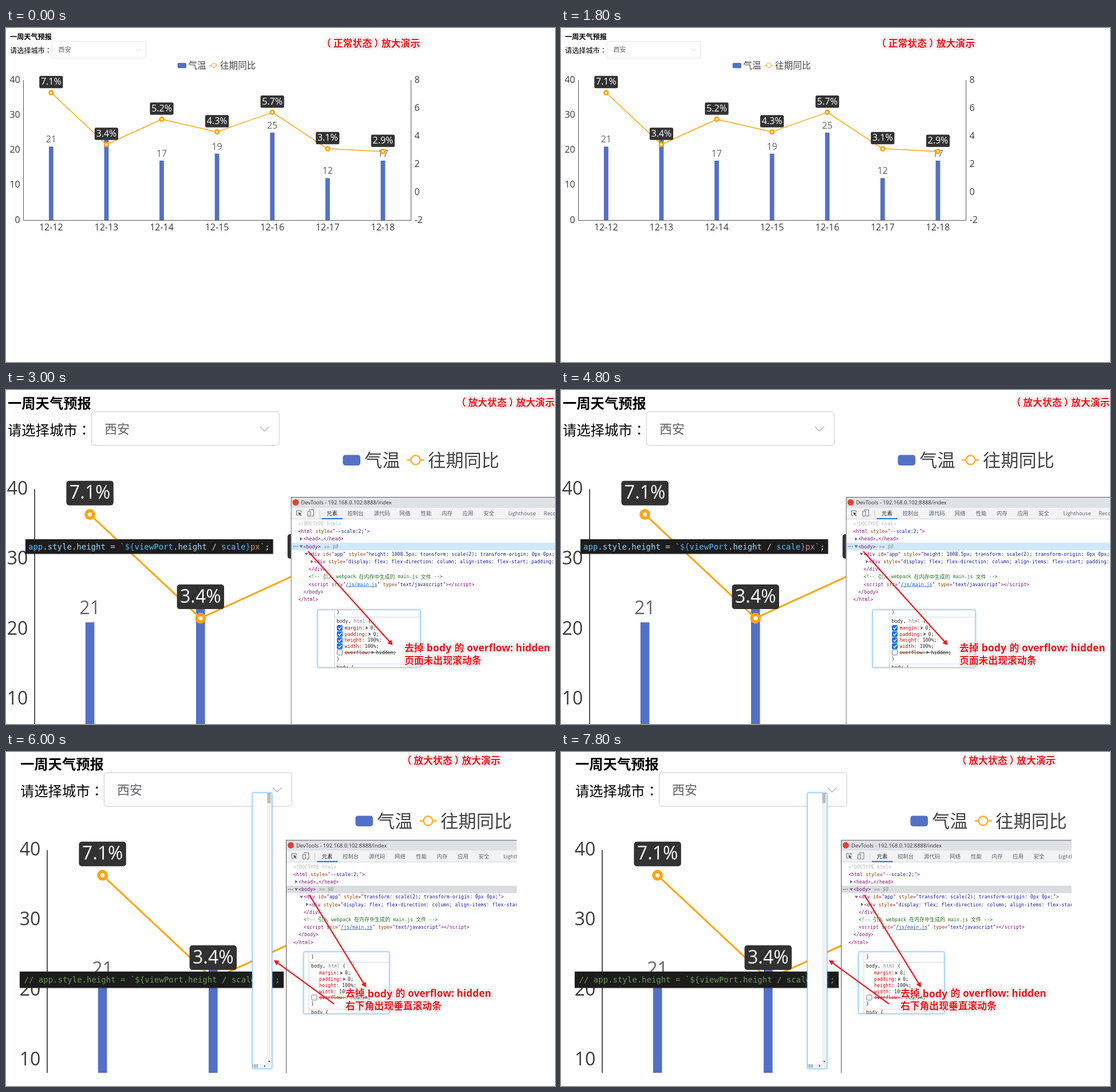
An HTML page that plays this animation: 959 px wide and 584 px high, repeating every 9 s.

```html
<!DOCTYPE html>
<html lang="zh-CN">
<head>
<meta charset="utf-8">
<style>
html, body { margin: 0; width: 100%; height: 100%; overflow: hidden; background: #fff; }
#stage { display: block; width: 959px; height: 584px; }
text { white-space: pre; font-family: "Open Sans", "Noto Sans CJK SC", "Noto Sans CJK", sans-serif; }
.mono { font-family: "DejaVu Sans Mono", "Noto Sans CJK SC", monospace; }
.colon { font-family: "Noto Sans CJK JP", "Noto Sans CJK", sans-serif; }
.note { fill: #e8141c; font-weight: 700; stroke: #fff; stroke-width: 3px; stroke-linejoin: round; paint-order: stroke; }
</style>
</head>
<body>
<svg id="stage" viewBox="0 0 959 584"></svg>
<script>
const RED = '#e8141c', ORANGE = '#ffa50f', BLUE = '#5470c6';
const TAG = '#881280', ATTR = '#994500', VAL = '#1a1aa6', GREY = '#bbb', GREEN = '#236e25';

const esc = s => s.replace(/&/g, '&amp;').replace(/</g, '&lt;').replace(/>/g, '&gt;');
const rect = (x, y, w, h, fill, more = '') =>
  `<rect x="${x}" y="${y}" width="${w}" height="${h}" fill="${fill}" ${more}/>`;
const path = (d, stroke, w = 1, more = '') =>
  `<path d="${d}" fill="none" stroke="${stroke}" stroke-width="${w}" ${more}/>`;
const shape = (d, fill) => `<path d="${d}" fill="${fill}"/>`;
// text placed by its vertical centre
const label = (x, cy, size, s, fill = '#000', more = '') =>
  `<text x="${x}" y="${cy + size * 0.37}" font-size="${size}" fill="${fill}" ${more}>${esc(s)}</text>`;
const mid = 'text-anchor="middle"';
// one line built from alternating text and colour
const run = (x, cy, size, parts) => {
  let s = '';
  for (let i = 0; i < parts.length; i += 2) s += `<tspan fill="${parts[i + 1]}">${esc(parts[i])}</tspan>`;
  return `<text class="mono" x="${x}" y="${cy + size * 0.36}" font-size="${size}">${s}</text>`;
};
const mono = (x, cy, ...parts) => run(x, cy, 8.3, parts);
const right = (x, y) => shape(`M${x} ${y - 3}l4.5 3l-4.5 3z`, '#6e6e6e');
const down = (x, y) => shape(`M${x} ${y - 2}h6l-3 4.5z`, '#6e6e6e');

function weather() {
  const temps = [21, 23, 17, 19, 25, 12, 17];
  const rates = [7.1, 3.4, 5.2, 4.3, 5.7, 3.1, 2.9];
  const px = i => 78.8 + i * 96.6;
  const py = v => 336 - (v + 2) * 24.5;
  let s = label(7, 15.7, 12.15, '一周天气预报', '#000', 'font-weight="700"')
    + label(7, 39.2, 12.15, '请选择城市')
    + label(67.7, 39.2, 12.15, '：', '#000', 'class="colon"')
    + rect(80.2, 23.3, 164, 29.4, '#fff', 'rx="2.5" stroke="#dcdfe6" stroke-width=".9"')
    + label(91.5, 38.3, 11, '西安', '#606266')
    + path('M227.3 36.3l4 3.9l4-3.9', '#c0c4cc', 0.9)
    + rect(299.7, 61, 15.3, 9.2, BLUE, 'rx="2.2"')
    + label(318.5, 65.4, 15.6, '气温', '#444')
    + path('M355.7 65.4h15', '#fdb540', 1.4)
    + `<circle cx="363.2" cy="65.4" r="4" fill="#fff" stroke="#fdb540" stroke-width="1.4"/>`
    + label(374, 65.4, 15.6, '往期同比', '#444');
  for (let i = 0; i < 5; i++)
    s += label(24.7, 334.8 - i * 61.25, 16, `${i * 10}`, '#3c3c3c', 'text-anchor="end"');
  for (let i = 0; i < 6; i++) s += label(713.5, 334.8 - i * 49, 16, `${i * 2 - 2}`, '#3c3c3c');
  temps.forEach((t, i) => {
    const top = 336 - t * 6.125;
    s += rect(px(i) - 3.9, top, 7.8, 336 - top, BLUE);
  });
  s += path('M30.5 91V336.4H707.5V91', '#555');
  temps.forEach((t, i) => {
    s += label(px(i), 348, 16, `12-${12 + i}`, '#3c3c3c', mid)
      + label(px(i), 323 - t * 6.125, 16, `${t}`, '#666', mid);
  });
  s += path('M' + rates.map((v, i) => `${px(i)} ${py(v)}`).join('L'), ORANGE, 1.5, 'stroke-linejoin="round"');
  rates.forEach((v, i) => {
    const x = px(i), y = py(v);
    s += `<circle cx="${x}" cy="${y}" r="3.3" fill="#fff" stroke="${ORANGE}" stroke-width="2.9"/>`
      + rect(x - 20.6, y - 29.4, 41.2, 21.5, '#2a2a2a', 'rx="2.5" opacity=".96"')
      + label(x, y - 19.6, 16, v + '%', '#fff', mid + ' font-weight="500"');
  });
  return s;
}

const zoomed = (x, y) => `<g transform="translate(${x} ${y}) scale(2)">${weather()}</g>`;

function devtools(x, y, w, h, div, rowFill) {
  const row = i => 234 + i * 13.2;
  const tabs = [[560.5, '元素'], [597, '控制台'], [643, '源代码'], [688, '网络'], [725, '性能'],
    [761.5, '内存'], [798, '应用'], [834.5, '安全'], [878, 'Lighthouse'], [940, 'Recorder']];
  let s = rect(498, 187, w, h, '#fff')
    + rect(498, 187, w, 19, '#dee1e6')
    + rect(498, 206, w, 20, '#f1f3f4')
    + path(`M498 225.7h${w}`, '#cbcdd1', 0.8)
    + '<circle cx="506.5" cy="196.5" r="5.5" fill="#db4437"/>'
    + label(516, 197, 9.3, 'DevTools - 192.168.0.102:8888/index', '#333')
    + path('M516 214v-3h-8v8h3', '#6e6e6e')
    + shape('M511 213.5l6 2.4l-2.5 1l2.2 2.3l-1 1l-2.2-2.3l-1 2.2z', '#555')
    + path('M530 211v-1.5h8v11h-4M527.5 212.5h5v8h-5z', '#6e6e6e')
    + path('M548.5 210v12', '#ccc')
    + rect(552, 224, 36.5, 2, '#1a73e8');
  tabs.forEach(([tx, name], i) => s += label(tx, 216, 9.4, name, i ? '#5f6368' : '#222'));
  s += rect(498, row(3) - 6.5, w, 13, rowFill)
    + mono(511, row(0), '<!DOCTYPE html>', GREY)
    + mono(511, row(1), '<html ', TAG, 'style', ATTR, '="', TAG, '--scale:2;', VAL, '">', TAG)
    + right(514, row(2)) + mono(520, row(2), '<head>', TAG, '…', '#555', '</head>', TAG)
    + [503, 506, 509].map(cx => `<circle cx="${cx}" cy="${row(3)}" r="1" fill="#777"/>`).join('')
    + down(513, row(3)) + mono(520, row(3), '<body>', TAG)
    + `<g font-style="italic">${mono(556, row(3), '== $0', '#888')}</g>`
    + down(522, row(4))
    + mono(529, row(4), '<div ', TAG, 'id', ATTR, '="', TAG, 'app', VAL, '" ', TAG, 'style', ATTR, '="', TAG,
      div + 'transform: scale(2); transform-origin: 0px 0px;', VAL, '">', TAG)
    + right(533, row(5))
    + mono(538.5, row(5), '<div ', TAG, 'style', ATTR, '="', TAG,
      'display: flex; flex-direction: column; align-items: flex-start; padding: 10px;', VAL, '">', TAG)
    + mono(529, row(6), '</div>', TAG)
    + mono(529, row(7), '<!--', GREEN) + label(554, row(7), 9, '引入', GREEN)
    + mono(577, row(7), 'webpack', GREEN) + label(617, row(7), 9, '在内存中生成的', GREEN)
    + mono(685, row(7), 'main.js', GREEN) + label(725, row(7), 9, '文件', GREEN)
    + mono(748, row(7), '-->', GREEN)
    + mono(529, row(8), '<script ', TAG, 'src', ATTR, '="', TAG, '/js/main.js', '#1a5fd0', '" ', TAG,
      'type', ATTR, '="', TAG, 'text/javascript', VAL, '"><\/script>', TAG)
    + path(`M594 ${row(8) + 4.3}h55`, '#1a5fd0', 0.8)
    + mono(520, row(9), '</body>', TAG)
    + mono(511, row(10), '</html>', TAG)
    + path(`M${498 + w} 187.5H498.5V${187 + h}`, '#5c5f63', 1.2);
  return `<svg x="${x}" y="${y}" width="${w}" height="${h}" viewBox="498 187 ${w} ${h}">${s}</svg>`;
}

const frame = (x, y, w, h) =>
  rect(x, y, w, h, '#fff', 'rx="1.5" stroke="#8cc4f8" stroke-width="1.1" filter="url(#glow)"');

function rules(x, y, w, h, tx, ty, checked) {
  const props = [['margin:', '0;', 1], ['padding:', '0;', 1], ['height:', '100%;'],
    ['width:', '100%;'], ['overflow:', 'hidden;', 1]];
  let s = path(`M${tx - 4} 0V${h}`, '#ccc', 0.8)
    + path(`M${tx - 4} ${ty + 9}H${w}M${tx - 4} ${ty + 91}H${w}`, '#ccc', 0.8)
    + mono(tx, ty, '}', '#333')
    + mono(tx, ty + 16, 'body, ', '#222', 'html', '#888', ' {', '#333')
    + mono(tx, ty + 82, '}', '#333')
    + mono(tx, ty + 97, 'body {', '#333');
  props.forEach(([name, val, tri], i) => {
    const cy = ty + 28 + i * 10.7, off = i === 4, px = tx + 14, end = px + name.length * 5;
    if (off || checked)
      s += rect(tx + 1, cy - 4.5, 9, 9, off ? '#fff' : '#1a73e8', `rx="1.5" stroke="${off ? '#777' : '#1a73e8'}"`);
    if (!off && checked) s += path(`M${tx + 3} ${cy}l2 2.2l4-4.6`, '#fff', 1.4);
    s += mono(px, cy, name, '#c80000') + mono(end + (tri ? 10 : 5), cy, val, '#222');
    if (tri) s += right(end + 2, cy);
    if (off) s += path(`M${px} ${cy + 0.3}H${end + 45}`, '#444', 0.9);
  });
  return frame(x, y, w, h) + `<svg x="${x}" y="${y}" width="${w}" height="${h}">${s}</svg>`;
}

function arrow(x1, y1, x2, y2) {
  const a = Math.atan2(y2 - y1, x2 - x1) * 180 / Math.PI, n = Math.hypot(x2 - x1, y2 - y1);
  return `<g transform="translate(${x1} ${y1}) rotate(${a})" filter="url(#soft)">`
    + path(`M0 0H${n - 4}`, RED, 2) + shape(`M${n} 0l-8.5-4.5v9z`, RED) + '</g>';
}

const note = (x, cy, s, size = 16.8) => label(x, cy, size, s, RED, 'class="note"');
// the brackets stand a little away from the words between them
const caption = (x, cy, state) => '<g filter="url(#soft)">'
  + note(x - 4, cy, '（') + note(x + 16.8, cy, state)
  + note(x + 88, cy, '）') + note(x + 100.8, cy, '放大演示') + '</g>';
const remark = (x, cy, second) => '<g filter="url(#soft)">'
  + note(x, cy, '去掉') + note(x + 38.5, cy, 'body', 17.8) + note(x + 87.5, cy, '的')
  + note(x + 109, cy, 'overflow: hidden', 17.4) + note(x, cy + 22, second) + '</g>';

const strip = (x, y, w, h, tx, parts) =>
  rect(x, y, w, h, '#1e1e1e', 'filter="url(#soft)"') + run(tx, y + h / 2, 14, parts);

const NAME = '#4fc1ff', SKY = '#9cdcfe', KEY = '#569cd6', STR = '#ce9178', PALE = '#d4d4d4';

const normal = weather() + caption(555, 27, '正常状态');

const large = zoomed(-11, -8.5)
  + strip(34, 261, 432.5, 25.5, 39, ['app', NAME, '.', PALE, 'style', SKY, '.', PALE, 'height', SKY,
    ' = ', PALE, '`', STR, '${', KEY, 'viewPort', NAME, '.', PALE, 'height', SKY, ' / ', PALE,
    'scale', NAME, '}', KEY, 'px`', STR, ';', PALE])
  + devtools(497.5, 187, 461.5, 397, 'height: 1008.5px; ', '#cfe8fc')
  + rules(544.5, 384.5, 179, 100.5, 33, 3.5, true)
  + arrow(528, 282, 675.5, 446)
  + caption(790.5, 22, '放大状态')
  + remark(696, 450.5, '页面未出现滚动条');

const scrolled = `<svg width="892" height="561">${zoomed(11, -10.5)}</svg>`
  + strip(24, 384, 461, 28.5, 31.5, ['// app.style.height = `${viewPort.height / scale}px`;', '#6a9955'])
  + devtools(489, 153.6, 403, 407.4, '', '#dadce0')
  + frame(430.5, 71.5, 34, 482)
  + rect(456, 72, 7.5, 473, '#f1f1f1') + rect(456.5, 72, 6, 17.5, '#bdbdbd')
  + rect(431.5, 545, 32, 7.5, '#f1f1f1') + rect(431.5, 546, 9, 6, '#c1c1c1')
  + shape('M458 540h4l-2 2.5zM451 547v4l2.5-2z', '#555')
  + rules(520, 349.5, 149.5, 108, 13, 9, false)
  + arrow(530, 250, 629, 411.5)
  + arrow(573, 440.5, 468, 364)
  + caption(695.5, 15, '放大状态')
  + remark(593, 422, '右下角出现垂直滚动条');

const scenes = [normal, large, scrolled];
const stage = document.getElementById('stage');
stage.innerHTML = `<defs>
  <filter id="soft" filterUnits="userSpaceOnUse" x="-20" y="-20" width="1000" height="624">
    <feDropShadow dx="0" dy="0" stdDeviation="1.5" flood-color="#000" flood-opacity=".3"/></filter>
  <filter id="glow" filterUnits="userSpaceOnUse" x="0" y="0" width="959" height="584">
    <feDropShadow dx="0" dy="0" stdDeviation="2" flood-color="#5aa9f5" flood-opacity=".6"/></filter>
</defs>` + scenes.map(s => `<g class="scene" display="none">${s}</g>`).join('');
const groups = stage.querySelectorAll('.scene');

function draw(ms) {
  const now = Math.floor(ms % 9000 / 3000);
  groups.forEach((g, i) => g.setAttribute('display', i === now ? 'inline' : 'none'));
}
const start = performance.now();
function tick() {
  draw(performance.now() - start);
  requestAnimationFrame(tick);
}
tick();
</script>
</body>
</html>
```
